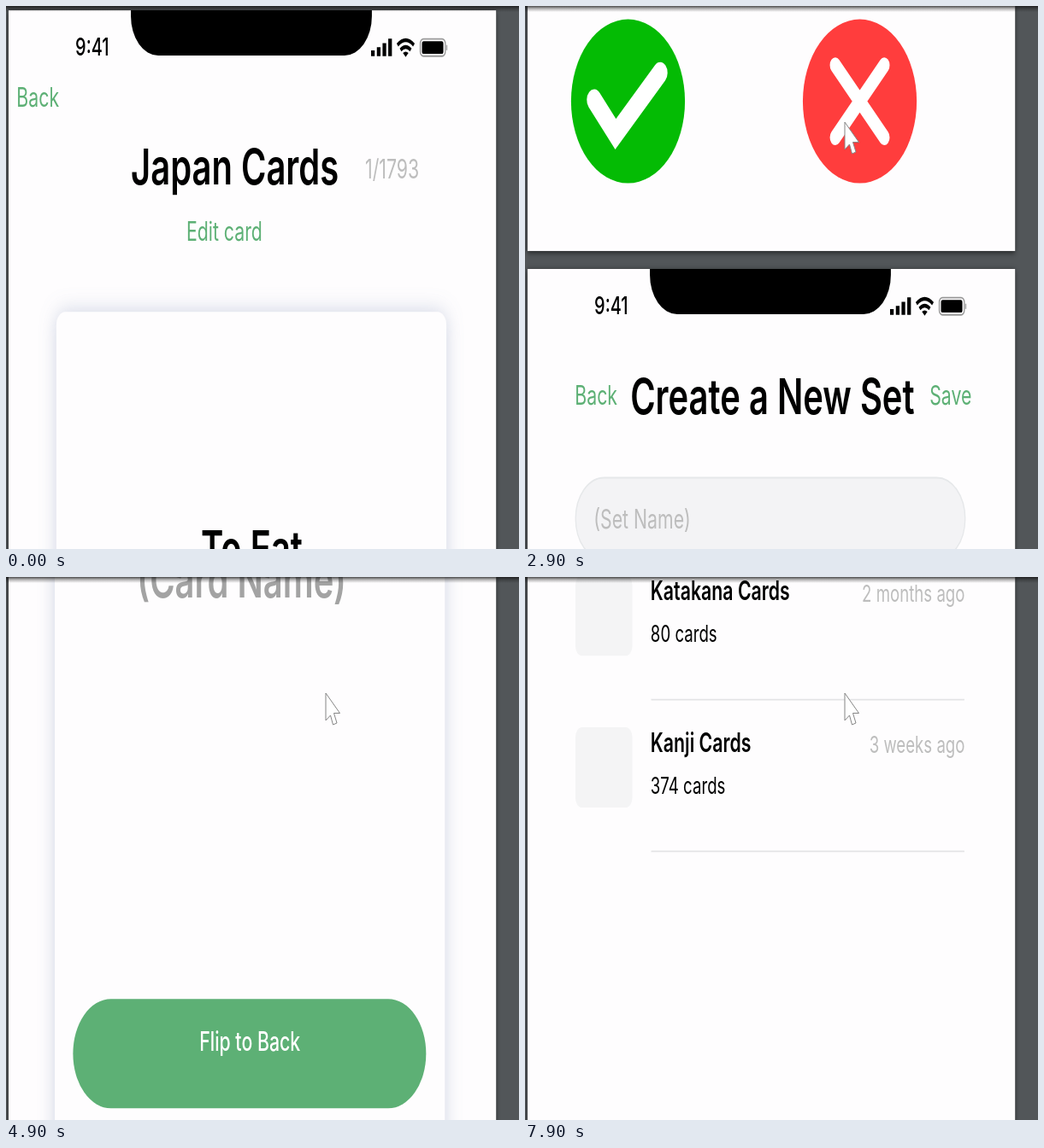
An HTML page that plays this animation: 600 by 636 pixels, repeating every 8 s.

```html
<!DOCTYPE html>
<html lang="en">
<head>
<meta charset="utf-8">
<title>Flash card screens</title>
<style>
html, body { margin: 0; width: 100%; height: 100%; overflow: hidden; background: #525659; }
svg { display: block; width: 600px; height: 636px; }
text { font: 400 16px Inter, sans-serif; }
.title { font-size: 30px; font-weight: 600; }
.bold { font-weight: 600; }
.semi { font-weight: 550; }
.small { font-size: 14px; }
.mid { text-anchor: middle; }
.end { text-anchor: end; }
.green { fill: #5db075; }
.grey { fill: #bdbdbd; }
.white { fill: #fff; }
.paper { fill: #fefdfe; }
.field { fill: #f3f3f5; stroke: #e6e8ea; }
.line { stroke: #e4e4e6; }

#scroll { animation: scroll 8s step-end infinite; }
#pointer { animation: show 8s step-end infinite; }
@keyframes scroll {
  0% { transform: translateY(5px); }
  23.75% { transform: translateY(-665px); }
  36.25% { transform: translateY(-1491px); }
  48.75% { transform: translateY(-1989px); }
  61.25% { transform: translateY(-2451px); }
  73.75% { transform: translateY(-3239px); }
  86.25% { transform: translateY(-3788px); }
  98.75%, 100% { transform: translateY(-4333px); }
}
@keyframes show {
  0% { opacity: 0; }
  11.25%, 100% { opacity: 1; }
}
</style>
</head>
<body>
<svg viewBox="0 0 600 636">
  <defs>
    <linearGradient id="shade" x2="0" y2="1">
      <stop offset="0" stop-color="#111" stop-opacity=".75"/>
      <stop offset=".45" stop-color="#111" stop-opacity=".3"/>
      <stop offset="1" stop-color="#111" stop-opacity="0"/>
    </linearGradient>
    <filter id="pageShadow">
      <feDropShadow dx="0" dy="1" stdDeviation="2" flood-color="#000" flood-opacity=".6"/>
    </filter>
    <filter id="cardShadow">
      <feDropShadow dx="0" dy="0" stdDeviation="7" flood-color="#8c98bc" flood-opacity=".42"/>
    </filter>

    <g id="screen">
      <rect class="paper" width="428" height="926" filter="url(#pageShadow)"/>
      <path d="M107.4 0H319V3.600a24 24 0 0 1-24 24H131.400a24 24 0 0 1-24-24Z"/>
      <text class="semi" x="58.600" y="27.600" font-size="15" style="font-size:15px">9:41</text>
      <path d="M319.900 24.500V28M325 22.500V28M330 20V28M335 17.300V28" stroke="#000" stroke-width="3.200"/>
      <g fill="none" stroke="#000" stroke-width="2.300">
        <path d="M341.500 21.200Q348.700 15.300 355.900 21.200M344.200 24.200Q348.700 20.500 353.200 24.200"/>
        <path d="M346.300 26L348.700 28.500L351.100 26Q348.700 24.400 346.300 26Z" fill="#000" stroke="none"/>
      </g>
      <rect x="361.500" y="17.500" width="22" height="10.500" rx="2.800" fill="none" stroke="#999"/>
      <rect x="363" y="18.900" width="18.800" height="7.700" rx="1.500"/>
      <path d="M384.700 21.200v3.200" stroke="#aaa" stroke-width="1.200"/>
    </g>

    <g id="card">
      <rect class="paper" width="342.400" height="544" rx="8" filter="url(#cardShadow)"/>
      <rect class="green" x="16" y="400" width="310" height="66.700" rx="33.350"/>
      <text class="semi mid white" x="171.300" y="431.800">Flip to Back</text>
    </g>

    <rect id="field" class="field" x="42.200" y="127.300" width="342" height="50" rx="25"/>
    <text id="back" class="green" x="41.500" y="82.800">Back</text>
  </defs>

  <rect width="600" height="636" fill="#525659"/>

  <g id="scroll">
    <g transform="translate(3 0) scale(1.332 1.92)">
      <use href="#screen"/>
      <text class="green" x="7" y="58.900">Back</text>
      <text class="title mid" x="198.700" y="106.300">Japan Cards</text>
      <text class="grey mid" x="336.800" y="102.600">1/1793</text>
      <text class="green mid" x="189.500" y="140.600">Edit card</text>
      <use href="#card" x="42" y="184"/>
      <text class="title mid" x="213.600" y="339">To Eat</text>
      <path d="M174.400 454.700H182.400L197.500 443.750H199V480.200H197.500L182.400 468.800H174.400Q173.400 468.800 173.400 467.800V455.700Q173.400 454.700 174.400 454.700Z"/>
      <path d="M205.600 451.800Q213.500 462.200 205.600 472.600M214.500 443.600Q227 461.700 214.500 479.800" fill="none" stroke="#000" stroke-width="4.400" stroke-linecap="round"/>
      <g transform="translate(88.200 834.700)" fill="none" stroke="#fff">
        <circle r="50" fill="#04bb04" stroke="none"/>
        <path d="M-29.700-.8L-10.900 20L28.200-17.400" stroke-width="13" stroke-linecap="round"/>
      </g>
      <g transform="translate(291.700 834.700)" fill="none" stroke="#fff">
        <circle r="50" fill="#ff3d3d" stroke="none"/>
        <path d="M-21.500-22L21.500 22M21.500-22L-21.500 22" stroke-width="9.500" stroke-linecap="round"/>
      </g>
    </g>

    <g transform="translate(3 1799) scale(1.332 1.92)">
      <use href="#screen"/>
      <use href="#back"/>
      <text class="title mid" x="215" y="88.500">Create a New Set</text>
      <text class="green end" x="390" y="82.800">Save</text>
      <use href="#field"/>
      <text class="grey" x="58" y="158.300">(Set Name)</text>
      <use href="#card" x="40.600" y="197"/>
      <text class="title mid" x="204.600" y="352" fill="#a3a3a3">(Card Name)</text>
      <rect class="field" x="18.300" y="793.400" width="341" height="49.200" rx="24.600"/>
      <rect class="white" x="18.800" y="793.900" width="173" height="48.200" rx="24.100"/>
      <text class="semi green mid" x="104.700" y="824">Next Card</text>
      <text class="semi mid" x="271.400" y="824" fill="#e8262c">Delete Set</text>
    </g>

    <g id="home" transform="translate(3 3598) scale(1.332 1.92)">
      <use href="#screen"/>
      <use href="#back"/>
      <text class="title mid" x="214.700" y="88.500">Flash Card App</text>
      <use href="#field"/>
      <text class="grey" x="58" y="158.300">Search</text>
      <g id="list"></g>
    </g>
  </g>

  <rect width="600" height="7" fill="url(#shade)"/>
  <path id="pointer" d="M374 136V168L379.500 162L382.500 173L387 171L383.500 159.500H390.500Z" fill="#fff" stroke="#858585"/>
</svg>
<script>
const sets = [
  ["Japan Cards", 1793, "1 day ago"],
  ["Hiragana Cards", 80, "2 months ago"],
  ["Katakana Cards", 80, "2 months ago"],
  ["Kanji Cards", 374, "3 weeks ago"]
];
const row = ([name, count, date], i) => `
  <g transform="translate(0 ${196.7 + i * 92.6})">
    <rect x="42" width="50" height="49" rx="6" fill="#f4f4f5"/>
    <text class="bold" x="108" y="15.1">${name}</text>
    <text class="small" x="108" y="40.6">${count} cards</text>
    <text class="small grey end" x="384" y="15.8">${date}</text>
    <path class="line" d="M108.500 75.700H383.600"/>
  </g>`;
document.getElementById("list").innerHTML = sets.map(row).join("");
</script>
</body>
</html>
```
